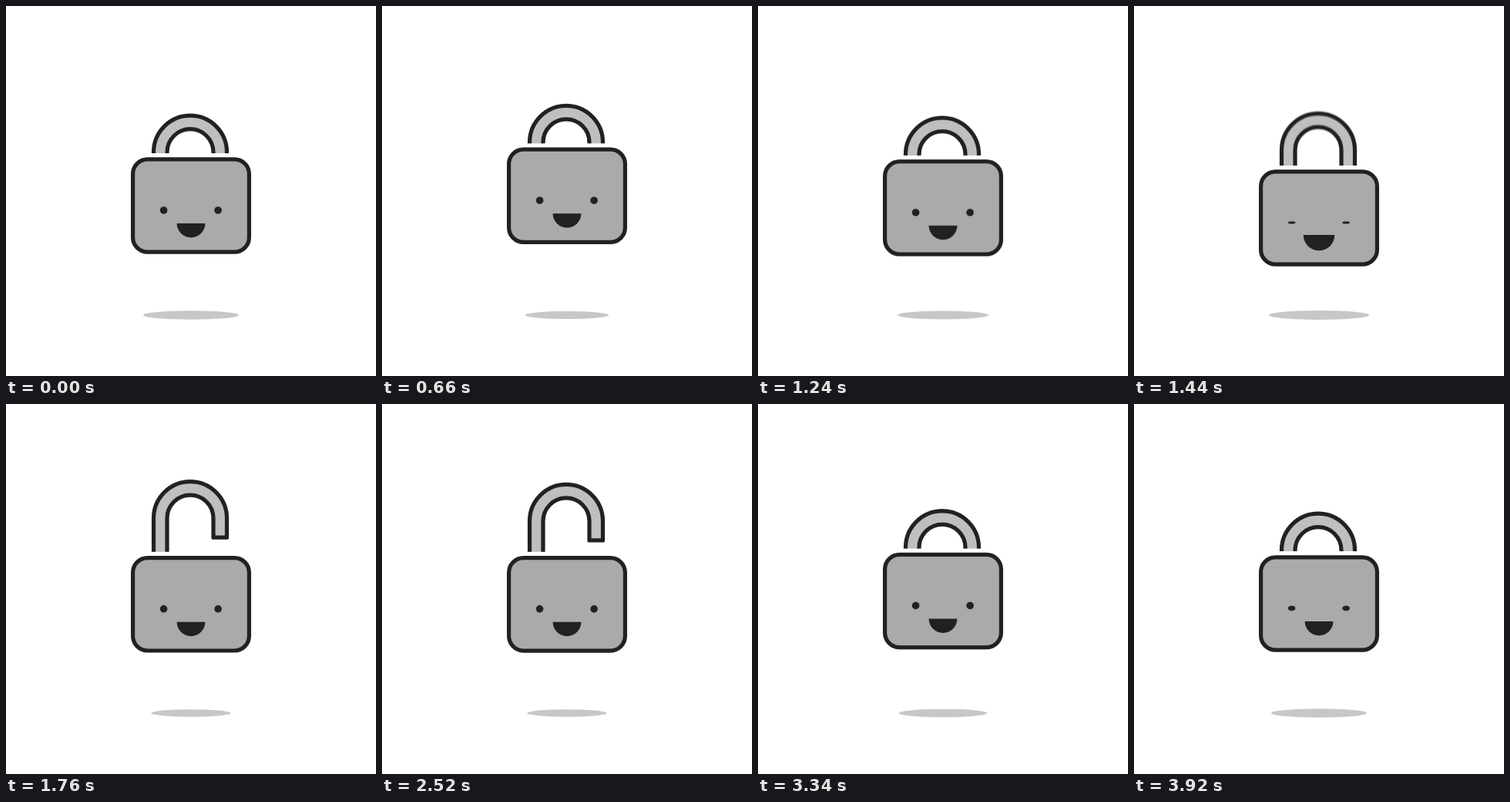
An HTML page with a canvas for the animation above (3.94 s loop, 480 px wide and 480 px high).

```html
<!DOCTYPE html>
<html lang="en">
<head>
<meta charset="utf-8">
<title>Padlock</title>
<style>
  html, body { margin: 0; width: 100%; height: 100%; overflow: hidden; background: #fff; }
  canvas { display: block; width: 480px; height: 480px; }
</style>
</head>
<body>
<canvas id="stage" width="480" height="480"></canvas>
<script>
const LOOP = 3940, STEP = 20, SHUTTER = 10, SAMPLES = 8;
const INK = '#212121', BODY = '#aaa', METAL = '#bfbfbf', SHADE = '#c7c7c7';

// Keys: [time, value, skew of the ease leading to it]
const tracks = {
  y: [[30, 0], [845, -14.7], [1420, 16, 1.6], [1440, 16], [1635, .8], [2505, .8],
      [2950, 16], [3070, 16], [3370, -4], [3590, 0]],
  lift: [[1330, 56.5], [1600, 108], [1850, 95], [2505, 95], [2955, 123.3], [3280, 56.5]],
  shadow: [[30, 62], [960, 51.6], [1030, 51.6], [1430, 65.2], [1640, 51.6], [2505, 51.6],
           [3000, 62], [3060, 62], [3560, 54], [3940, 62]],
  eye: [[1300, 1], [1400, .1], [1520, 1], [3790, 1], [3890, .1], [3940, 1]],
  mouth: [[1300, 1], [1440, 1.1], [1640, 1]]
};

function at(keys, t) {
  const i = keys.findIndex(k => k[0] > t);
  if (i < 0) return keys[keys.length - 1][1];
  if (i === 0) return keys[0][1];
  const [t0, v0] = keys[i - 1], [t1, v1, skew = 1] = keys[i];
  const u = ((t - t0) / (t1 - t0)) ** skew;
  return v0 + (v1 - v0) * u * u * (3 - 2 * u);
}

const stage = document.getElementById('stage').getContext('2d');
const buffer = document.createElement('canvas');
buffer.width = buffer.height = 480;
const c = buffer.getContext('2d');

function fillEllipse(x, y, rx, ry, color, end = Math.PI * 2) {
  c.beginPath();
  c.ellipse(x, y, rx, ry, 0, 0, end);
  c.fillStyle = color;
  c.fill();
}

function outline(color) {
  c.fillStyle = color;
  c.fill();
  c.strokeStyle = INK;
  c.lineWidth = 5.2;
  c.lineJoin = 'round';
  c.stroke();
}

function drawShackle(top, limit) {
  const cy = top + 50, end = cy + 25;
  c.save();
  c.beginPath();
  c.rect(0, 0, 480, limit);
  c.clip();
  c.beginPath();
  c.moveTo(191.5, 300);
  c.arc(239, cy, 47.5, Math.PI, 0);
  c.lineTo(286.5, end);
  c.lineTo(269, end);
  c.arc(239, cy, 30, 0, Math.PI, true);
  c.lineTo(209, 300);
  outline(METAL);
  c.restore();
}

function drawScene(t) {
  const v = {};
  for (const name in tracks) v[name] = at(tracks[name], t);
  const top = 196.2 + v.y;

  c.fillStyle = '#fff';
  c.fillRect(0, 0, 480, 480);
  fillEllipse(240, 401, v.shadow, v.shadow * .093, SHADE);
  drawShackle(top - v.lift, top - 5.2);

  c.beginPath();
  c.roundRect(164.6, top + 2.6, 150.8, 120.4, 19);
  outline(BODY);
  for (const x of [204.6, 275.1]) fillEllipse(x, top + 68.8, 4.8, 4.8 * v.eye, INK);
  const r = 18.4 * v.mouth;
  fillEllipse(240, top + 95 - r / 2, r, r, INK, Math.PI);
}

// Average several moments for motion blur
function render(now) {
  const t = Math.floor((now % LOOP) / STEP) * STEP;
  for (let i = 0; i < SAMPLES; i++) {
    drawScene((t + ((i + .5) / SAMPLES - .5) * SHUTTER + LOOP) % LOOP);
    stage.globalAlpha = 1 / (i + 1);
    stage.drawImage(buffer, 0, 0);
  }
}

const start = performance.now();
function tick() {
  render(performance.now() - start);
  requestAnimationFrame(tick);
}
tick();
</script>
</body>
</html>
```
